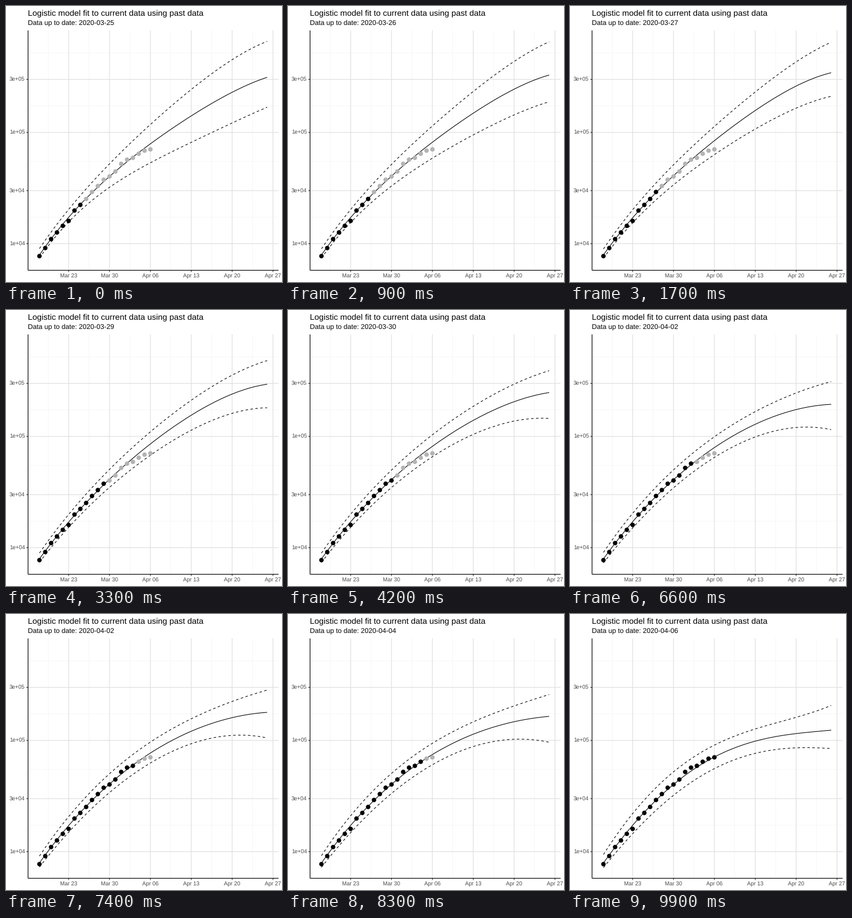
A matplotlib script for the animation above (10000 ms loop, 480 by 480 pixels).

```python
import numpy as np
import matplotlib.pyplot as plt
from matplotlib.animation import FuncAnimation
from matplotlib.patches import Circle

plt.rcParams["font.family"] = "Liberation Sans"
plt.rcParams["text.hinting"] = "none"

SIZE, DPI = 480, 72
FRAMES, INTERVAL = 100, 100
STEPS = 12                      # daily refits after the first one
LEFT, RIGHT, TOP, BOTTOM = 38.36, 474, 42.4, 459.6
GREY20, GREY30 = "#333333", "#4d4d4d"
MAJOR, MINOR, FUTURE = "#dedede", "#f0f0f0", "#b3b3b3"

CASES = [7730, 9134, 10995, 12612, 14459, 16018, 19856, 22302, 25233, 29155,
         32964, 37575, 40174, 44550, 52128, 56989, 59105, 64338, 68605, 70478]

# Heights of the forecast at every second refit.
MID_19 = [240, 233.5, 231.5, 241, 238.5, 244.5, 249]
MID_26 = [191, 182, 183.5, 201, 199, 209, 221]
MID_END = [124, 116, 129, 158, 164, 178, 202]
UPPER_END = [61.5, 63, 88, 123, 124.5, 140, 159]
LOWER_END = [176, 157, 170, 207, 208, 223, 234]

days = np.arange(40)


def px(day):
    """Horizontal position of a day counted from 18 March."""
    return 58.16 + 10.155 * day


def py(count):
    """Vertical position of a count on the log axis."""
    return 413.3 - 193.4 * (np.log10(count) - 4)


def smooth(knots, heights, degree):
    return np.polyval(np.polyfit(knots, heights, degree), days)


def forecast(step):
    """Middle, upper and lower curve after a number of refits."""
    u = step / 2
    mid19, mid26, end, top, low = (
        np.interp(u, range(7), keys)
        for keys in (MID_19, MID_26, MID_END, UPPER_END, LOWER_END))
    middle = smooth([0, 5, 12, 19, 26, 39],
                    [433, 367.7, 296, mid19, mid26, end], 4)

    # The band is narrowest halfway through the refits.
    early = 16.5 + 0.6 * (u - 3) ** 2
    late = 21 + 25 * np.exp(-0.8 * u)
    knots = [0, 12, 26, 39]
    above = smooth(knots, [10 + 0.3 * (u - 2) ** 2, early, late, end - top], 3)
    below = smooth(knots, [5 + 0.5 * u, early - 3, late, low - end], 3)
    return middle, middle - above, middle + below


fig = plt.figure(figsize=(SIZE / DPI, SIZE / DPI), dpi=DPI, facecolor="white")
ax = fig.add_axes([0, 0, 1, 1])
ax.set_xlim(0, SIZE)
ax.set_ylim(SIZE, 0)
ax.axis("off")


def stroke(x, y, color="black", width=1.07, z=3, **kw):
    return ax.plot(x, y, color=color, lw=width, zorder=z, snap=False,
                   solid_capstyle="butt", dash_capstyle="butt", **kw)[0]


def vline(x, color, width, z):
    stroke([x, x], [TOP, BOTTOM], color, width, z)


def hline(y, color, width, z):
    stroke([LEFT, RIGHT], [y, y], color, width, z)


def label(x, y, text, size, color="black", ha="left"):
    return ax.text(x, y, text, fontsize=size, color=color, ha=ha,
                   va="baseline")


def draw_axes():
    half = np.log10(3) / 2
    for week in range(6):
        vline(px(7 * week + 1.5), MINOR, 0.58, 0)
    for power in (4 - half, 4 + half, 4.5 + half, 5 + half, 5 + 3 * half):
        hline(py(10 ** power), MINOR, 0.58, 0)

    names = ["Mar 23", "Mar 30", "Apr 06", "Apr 13", "Apr 20", "Apr 27"]
    for week, name in enumerate(names):
        x = px(5 + 7 * week)
        vline(x, MAJOR, 1.16, 1)
        stroke([x, x], [BOTTOM, BOTTOM + 3], GREY20, 1.16, 2)
        label(x, 473, name, 9.6, GREY30, "center")
    for name in ("1e+04", "3e+04", "1e+05", "3e+05"):
        y = py(float(name))
        hline(y, MAJOR, 1.16, 1)
        stroke([LEFT - 3, LEFT], [y, y], GREY20, 1.16, 2)
        label(LEFT - 5.4, y + 3.4, name, 9.6, GREY30, "right")
    vline(LEFT, "black", 1.16, 6)
    hline(BOTTOM, "black", 1.16, 6)


draw_axes()
label(LEFT, 17, "Logistic model fit to current data using past data", 14.4)
subtitle = label(LEFT, 34, "", 12)

dashed = (0, (4, 4))
curves = [stroke([], [], linestyle=style) for style in ("-", dashed, dashed)]
dots = [ax.add_patch(Circle((px(day), py(count)), 3.9, lw=0, zorder=5))
        for day, count in enumerate(CASES)]


def update(i):
    # The data snaps to the nearest frame, the date counts whole days passed.
    gap = (FRAMES - 1) / STEPS
    step = sum(round(1 + gap * k) - 1 <= i for k in range(1, STEPS + 1))
    date = np.datetime64("2020-03-25") + STEPS * i // (FRAMES - 1)
    subtitle.set_text(f"Data up to date: {date}")
    for line, heights in zip(curves, forecast(step)):
        line.set_data(px(days), heights)
    for day, dot in enumerate(dots):
        dot.set_facecolor("black" if day < 8 + step else FUTURE)
    return [subtitle, *curves, *dots]


anim = FuncAnimation(fig, update, frames=FRAMES, interval=INTERVAL,
                     init_func=lambda: update(0), repeat=True, repeat_delay=0)
plt.show()
```
